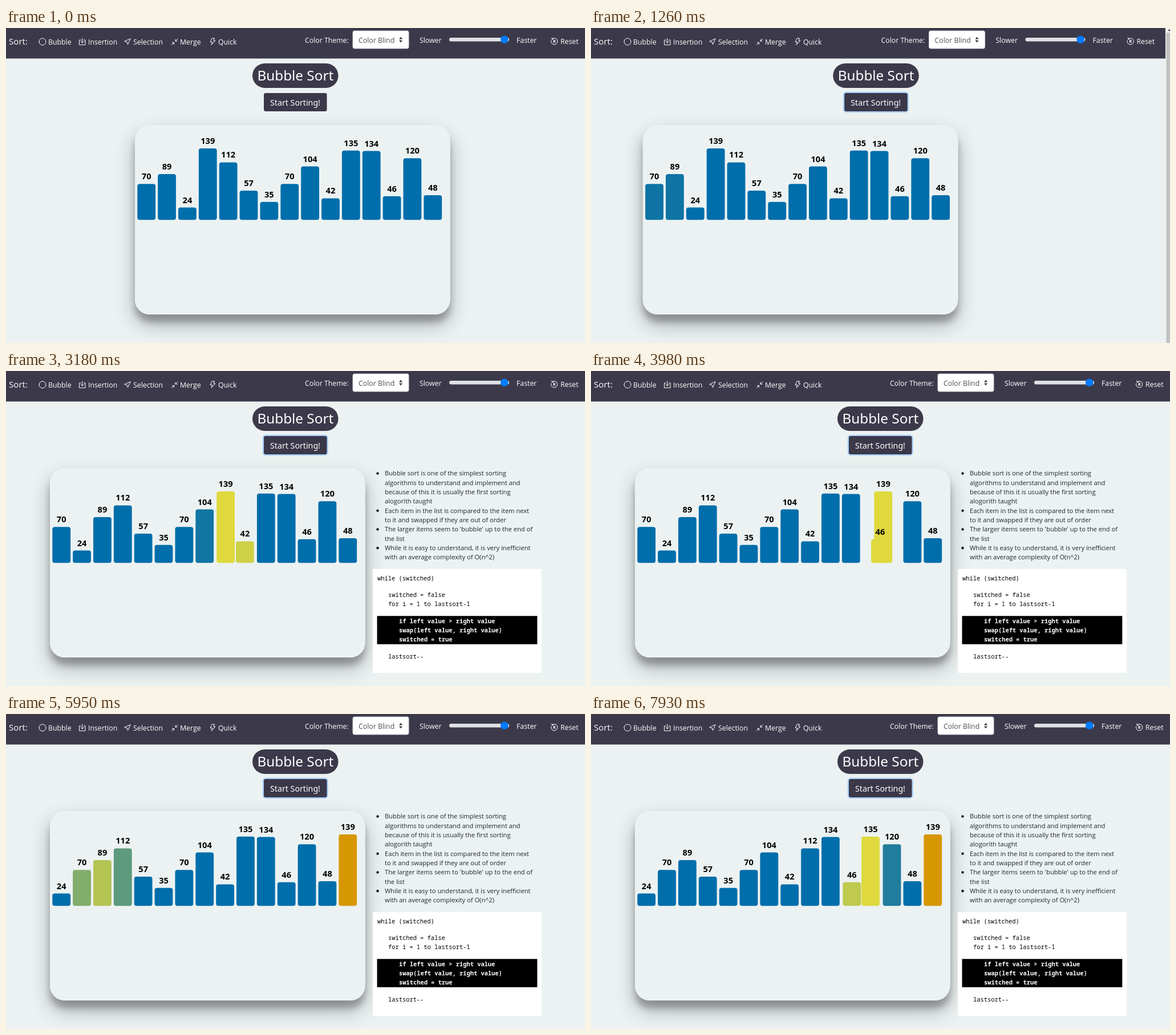
Animation, 1015 px wide and 552 px high, one loop 8 s. Source, as an HTML page with a canvas:

```html
<!DOCTYPE html>
<html lang="en">
<head>
<meta charset="utf-8">
<title>Bubble Sort</title>
<style>
html, body { margin: 0; width: 100%; height: 100%; overflow: hidden; background: #ecf2f2; }
canvas { display: block; }
</style>
</head>
<body>
<canvas id="stage" width="1015" height="552"></canvas>
<script>
const ctx = document.getElementById('stage').getContext('2d');

const LOOP = 8000, FADE = 200, TICK = 79.4, CLICK = 70;
const BG = '#ecf2f2', DARK = '#3c3a4a';
const BLUE = [0, 110, 171], YELLOW = [223, 217, 62], ORANGE = [214, 151, 0];
const UI = '"Open Sans", "Noto Sans", sans-serif';
const WIDE = '"Noto Sans", "Open Sans", sans-serif';
const MONO = '"Noto Sans Mono", "DejaVu Sans Mono", monospace';
const PITCH = 35.86;

const VALUES = [70, 89, 24, 139, 112, 57, 35, 70, 104, 42, 135, 134, 46, 120, 48];
const PASSES = [
  { start: 1252, swap: 245.5, hold: 157.5 },
  { start: 5506, swap: 244, hold: 151 }
];

const NOTES = [
  ['Bubble sort is one of the simplest sorting', 'algorithms to understand and implement and',
    'because of this it is usually the first sorting', 'alogorith taught'],
  ['Each item in the list is compared to the item next', 'to it and swapped if they are out of order'],
  ["The larger items seem to 'bubble' up to the end of", 'the list'],
  ['While it is easy to understand, it is very inefficient', 'with an average complexity of O(n^2)']
];

const CODE = [
  { id: 'while', x: 651, y: 355, lines: ['while (switched)'] },
  { id: 'for', x: 670, y: 384, lines: ['switched = false', 'for i = 1 to lastsort-1'] },
  { id: 'if', x: 689, y: 429.5, lines: ['if left value > right value', 'swap(left value, right value)', 'switched = true'] },
  { id: 'last', x: 670, y: 491.5, lines: ['lastsort--'] }
];

// CSS "ease": cubic-bezier(.25, .1, .25, 1)
function ease(x) {
  if (x <= 0) return 0;
  if (x >= 1) return 1;
  const curve = (a, b, u) => 3 * a * u * (1 - u) ** 2 + 3 * b * u * u * (1 - u) + u ** 3;
  let lo = 0, hi = 1;
  for (let i = 0; i < 20; i++) {
    const mid = (lo + hi) / 2;
    if (curve(.25, .25, mid) < x) lo = mid; else hi = mid;
  }
  return curve(.1, 1, lo);
}

// A track is a list of [time, value] keys; each key eases in from wherever the track is.
function setKey(track, time, value) {
  if (track[track.length - 1][1] !== value) track.push([time, value]);
}

function valueAt(track, t, i = track.length - 1) {
  while (i > 0 && track[i][0] > t) i--;
  const [time, value] = track[i];
  if (i === 0) return value;
  const from = valueAt(track, time, i - 1);
  return from + (value - from) * ease((t - time) / FADE);
}

function simulate() {
  const bars = VALUES.map((value, i) => ({
    value, slot: [[0, i]], lit: [[0, 0]], done: [[0, 0]]
  }));
  const order = [...bars];
  let end = order.length - 1;
  for (const pass of PASSES) {
    let time = pass.start;
    for (let i = 0; i < end; i++) {
      const left = order[i], right = order[i + 1];
      setKey(left.lit, time, 1);
      setKey(right.lit, time, 1);
      const swaps = left.value > right.value;
      time += swaps ? pass.swap : pass.hold;
      if (swaps) {
        order[i] = right;
        order[i + 1] = left;
        setKey(left.slot, time - 122, i + 1);
        setKey(right.slot, time - 122, i);
      } else {
        setKey(right.lit, time - 35, 0); // brief dip before being lit again
      }
      setKey(order[i].lit, time, 0);
    }
    setKey(order[end].done, time, 1);
    end--;
  }
  return bars;
}

const bars = simulate();

const mix = (a, b, p) => a.map((v, i) => v + (b[i] - v) * p);
const rgb = c => `rgb(${c.map(Math.round).join()})`;

function box(x, y, w, h, r, fill) {
  ctx.beginPath();
  ctx.roundRect(x, y, w, h, r);
  ctx.fillStyle = fill;
  ctx.fill();
}

function text(str, x, y, font, fill = '#fff', align = 'left') {
  ctx.font = font;
  ctx.fillStyle = fill;
  ctx.textAlign = align;
  ctx.fillText(str, x, y);
}

function stroke(path, x = 0, y = 0) {
  ctx.save();
  ctx.translate(x, y);
  ctx.strokeStyle = '#fff';
  ctx.lineWidth = 1;
  ctx.lineJoin = ctx.lineCap = 'round';
  ctx.stroke(new Path2D(path));
  ctx.restore();
}

function disc(x, y, r, fill) {
  ctx.beginPath();
  ctx.arc(x, y, r, 0, 7);
  ctx.fillStyle = fill;
  ctx.fill();
}

function triangle(x, y, h) {
  ctx.beginPath();
  ctx.moveTo(x - 3, y);
  ctx.lineTo(x + 3, y);
  ctx.lineTo(x, y + h);
  ctx.fillStyle = '#343a40';
  ctx.fill();
}

function drawNav(shift) {
  const font = `12.3px ${UI}`;
  box(0, 0, 1015, 53.5, 0, DARK);
  text('Sort:', 5, 29, `15.1px ${UI}`);
  [['Bubble', 74], ['Insertion', 144], ['Selection', 223], ['Merge', 305], ['Quick', 372]]
    .forEach(([name, x]) => text(name, x, 28.5, font));
  stroke('M0 6a6 6 0 1 0 12 0a6 6 0 1 0-12 0', 58, 18);
  stroke('M3 3H.5V11.5H11V3H8.5M5.75 0V8M3 5.5L5.75 8L8.5 5.5', 128, 18);
  stroke('M10.5 .5L6 10.5L4.8 6.2L.5 5Z', 207.5, 18.5);
  stroke('M11 .5L7 4.5M7 1.5V4.5H10M.5 11L4.5 7M1.5 7H4.5V10', 290, 18.5);
  stroke('M4.5 .5H8.5L6.8 4.5H10L3 12L4.8 7H1.5Z', 357, 17.5);

  ctx.save();
  ctx.translate(shift, 0);
  text('Color Theme:', 524, 26, font);
  box(607.5, 4.5, 99, 32, 4, '#ced4da');
  box(608.5, 5.5, 97, 30, 3, '#fff');
  text('Color Blind', 618, 25.5, font, '#495057');
  triangle(692, 19.5, -4);
  triangle(692, 21.5, 4);
  text('Slower', 725, 26, font);
  box(777, 17, 105, 6.5, 3.2, '#dee2e6');
  disc(873.7, 20.2, 6.8, '#007bff');
  text('Faster', 895, 26, font);
  stroke('M2 2.6A5.7 5.7 0 1 1 .6 5M2 .2V2.8H4.6', 955, 16.8);
  text('R', 961.3, 25.8, `bold 7.5px ${UI}`, '#fff', 'center');
  text('Reset', 972, 28, font);
  ctx.restore();
}

function drawHeading(shift, focused) {
  ctx.save();
  ctx.translate(shift, 0);
  box(432, 62, 150.5, 43, 21.5, DARK);
  text('Bubble Sort', 507.3, 92, `500 24.3px ${WIDE}`, '#fff', 'center');
  if (focused) box(449.7, 111.8, 115, 36.4, 5.5, '#a9cff6');
  box(452, 114, 110.5, 32, 3, '#3a3849');
  text('Start Sorting!', 507, 136, `500 14.2px ${WIDE}`, '#fff', 'center');
  ctx.restore();
}

function drawPanel(x, t) {
  const shadow = (dy, blur, alpha) => {
    ctx.save();
    ctx.shadowColor = `rgba(0,0,0,${alpha})`;
    ctx.shadowBlur = blur;
    ctx.shadowOffsetY = dy;
    box(x, 170, 552.5, 332, 26, BG);
    ctx.restore();
  };
  shadow(17, 34, .3);
  shadow(13.5, 11, .22);
  box(x, 170, 552.5, 332, 26, BG);

  for (const bar of bars) {
    const left = x + 4.3 + valueAt(bar.slot, t) * PITCH;
    const height = bar.value * .9;
    const lit = mix(BLUE, YELLOW, valueAt(bar.lit, t));
    box(left, 336.2 - height, 31.8, height, 4, rgb(mix(lit, ORANGE, valueAt(bar.done, t))));
    text(bar.value, left + 15.9, 328.2 - height, `bold 14.6px ${WIDE}`, '#000', 'center');
  }
}

function activeBlock(t) {
  if (t < 4515) return 'if';
  if (t < 4895) return 'last';
  return t < 5450 ? 'for' : 'if';
}

function drawNotes(t) {
  ctx.save();
  ctx.globalAlpha = ease((t - 1640) / 800);
  let y = 183.3;
  for (const item of NOTES) {
    disc(651.5, y - 3.8, 2.3, '#212529');
    for (const line of item) {
      text(line, 664, y, `11.15px ${UI}`, '#212529');
      y += 16.33;
    }
  }
  box(643, 347, 296, 182, 0, '#fff');
  const active = activeBlock(t);
  for (const block of CODE) {
    const on = block.id === active;
    if (on) box(650.5, block.y - .3, 280.8, block.lines.length * 16.33 + .6, 0, '#000');
    block.lines.forEach((line, i) => text(line, block.x, block.y + 12 + i * 16.33,
      `${on ? 'bold ' : ''}10.4px ${MONO}`, on ? '#fff' : '#000'));
  }
  ctx.restore();
}

function drawScrollbar() {
  box(1007, 0, 8, 552, 0, '#f1f1f1');
  box(1008.5, 8, 7, 544, 0, '#c1c1c1');
  triangle(1014, 5, -3);
}

function draw(t) {
  const scrolling = t >= CLICK && t < 1610;
  const shift = scrolling ? -7.75 : 0;
  ctx.fillStyle = BG;
  ctx.fillRect(0, 0, 1015, 552);
  drawNav(shift * 2);
  drawHeading(shift, t >= CLICK);
  drawPanel(226 + shift - 149 * ease((t - 820) / 800), t);
  if (t > 1640) drawNotes(t);
  if (scrolling) drawScrollbar();
}

// The picture advances in steps, like a screen recording.
function stepped(t) {
  if (t < CLICK) return 0;
  return CLICK + 6 + Math.floor((t - CLICK) / TICK + .1) * TICK;
}

function loop() {
  draw(stepped(performance.now() % LOOP));
  requestAnimationFrame(loop);
}
loop();
</script>
</body>
</html>
```
